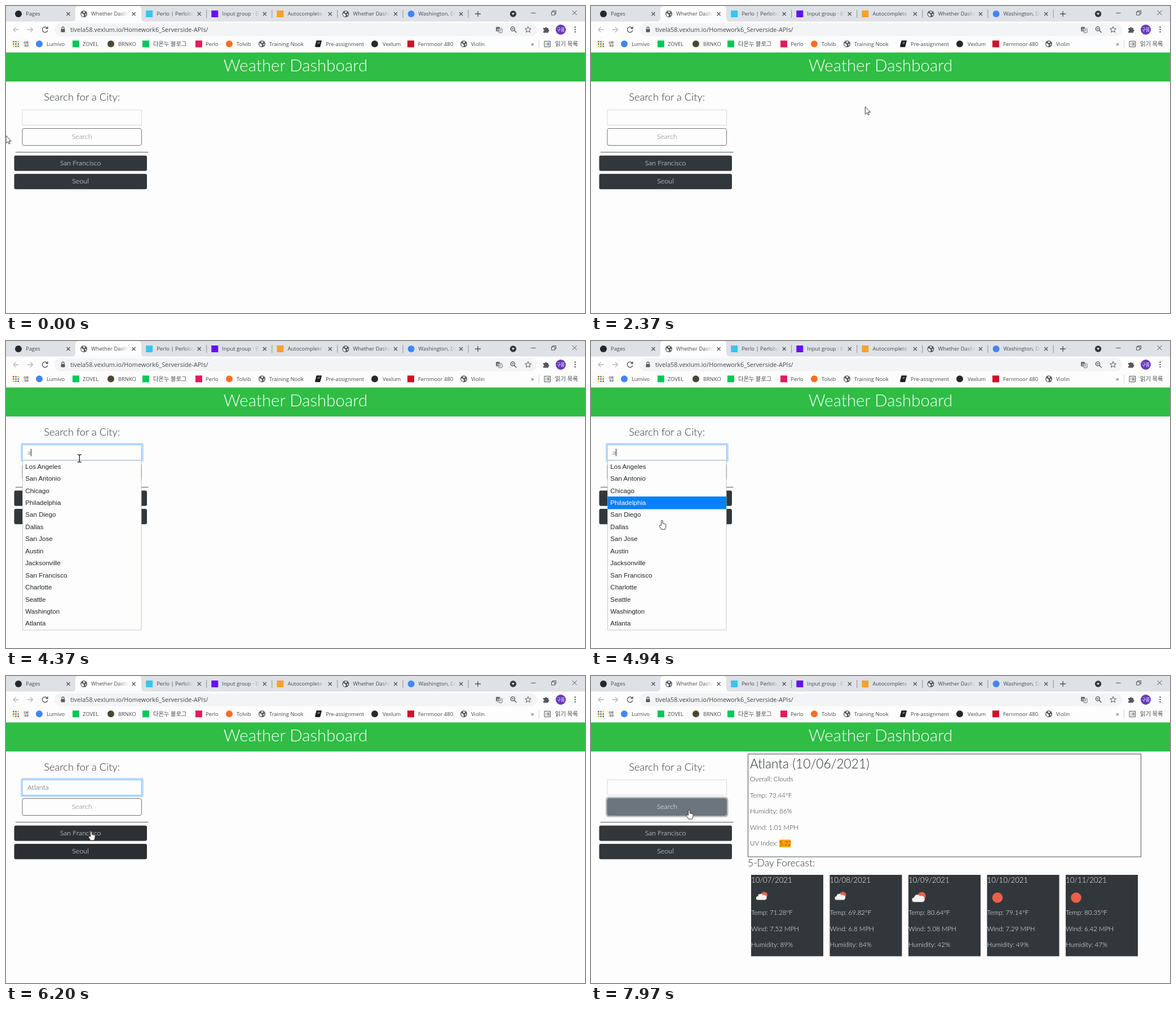
These frames come from a looping animation (1027 by 545 pixels, 8000 ms). An HTML page:

```html
<!DOCTYPE html>
<html lang="en">
<head>
<meta charset="utf-8">
<title>Weather Dashboard</title>
<style>
  html, body { margin: 0; width: 100%; height: 100%; overflow: hidden; background: #fdfdfd; }
  svg { display: block; width: 100vw; height: 100vh; }
  text { white-space: pre; }
  .ui { font: 9.4px "Open Sans", "Noto Sans", sans-serif; fill: #45484c; }
  .ko { font: 10.4px "Noto Sans CJK KR", "Noto Sans CJK", sans-serif; fill: #45484c; }
  .page { font-family: Lato, "Open Sans", sans-serif; font-weight: 300; fill: #2b3035; }
  .list { font: 11.6px "Liberation Sans", Arial, sans-serif; fill: #212529; }
  .line { fill: none; stroke: #4d5156; stroke-width: 1.3; }
  .mid { text-anchor: middle; }
</style>
</head>
<body>
<svg id="stage" viewBox="0 0 1027 545" xmlns="http://www.w3.org/2000/svg"></svg>
<script>
const LOOP = 8000;
const FOCUS = 3150, TYPE = 3900, PICK = 5660, CLICK = 6720, RESULT = 6850, ICONS = 7150;
const LIST_TOP = 212, ROW = 21.45;

const rect = (x, y, w, h, attrs = '') => `<rect x="${x}" y="${y}" width="${w}" height="${h}" ${attrs}/>`;
const circle = (x, y, r, fill) => `<circle cx="${x}" cy="${y}" r="${r}" fill="${fill}"/>`;
const path = (d, attrs = 'class="line"') => `<path d="${d}" ${attrs}/>`;
const text = (x, y, s, cls = 'ui', attrs = '') => `<text x="${x}" y="${y}" class="${cls}" ${attrs}>${s}</text>`;
const page = (x, y, size, s, attrs = '') => text(x, y, s, 'page', `font-size="${size}" ${attrs}`);
const group = (x, y, body, attrs = '') => `<g transform="translate(${x} ${y})" ${attrs}>${body}</g>`;

const icons = {
  dot: c => circle(0, 0, 6, c),
  box: c => rect(-6, -6, 12, 12, `fill="${c}"`),
  globe: () => circle(0, 0, 6, '#55595e') +
    path('M-4.6-1.5L-1.5-.2 .3 2.2-.6 4.8C-3.6 4.6-5 2-4.6-1.5ZM-1.5-4.8L2.4-4.2 1.4-1.6-1-1.9ZM2.4 .3L4.8-.6 3.6 3 2.3 2.6Z', 'fill="#f4f5f6"'),
  book: () => path('M-3-5.5H5.5L3 4.5H-5.5ZM-5 5.2H3.2', 'fill="#1c1c1c" stroke="#1c1c1c"') +
    path('M-1.2-2.8H3M-1.7-.8H2.3', 'stroke="#ddd" stroke-width=".7"')
};
const icon = (x, y, [kind, color]) => group(x, y, icons[kind](color));

const tabs = [
  ['dot', '#24292e', 'Pages'],
  ['globe', '', 'Whether Dashboard'],
  ['box', '#36c5f0', 'Perlo | Perlobot'],
  ['box', '#6610f2', 'Input group · Bootstrap'],
  ['box', '#f5a12d', 'Autocomplete'],
  ['globe', '', 'Whether Dashboard'],
  ['dot', '#4285f4', 'Washington, DC']
];
const bookmarks = [
  [59, 72, 'dot', '#4285f4', 'Lumivo'],
  [124, 136, 'box', '#03c75a', 'ZOVEL'],
  [186, 199, 'dot', '#4a4632', 'BRNKO'],
  [248, 261, 'box', '#03c75a', '다온누 블로그', 'ko'],
  [342, 354, 'box', '#e01e5a', 'Perlo'],
  [396, 409, 'dot', '#fc6d26', 'Tolvib'],
  [454, 467, 'globe', '', 'Training Nook'],
  [554, 567, 'book', '', 'Pre-assignment'],
  [654, 668, 'dot', '#24292e', 'Vexlum'],
  [718, 731, 'box', '#d0112b', 'Fernmoor 480'],
  [812, 825, 'globe', '', 'Violin']
];

function browserBar() {
  const tabStrip = tabs.map(([kind, color, label], i) =>
    group(22 + 116.1 * i, 14,
      icon(0, 0, [kind, color]) + text(13, 3.3, label, 'ui', 'style="fill:url(#fade)"') +
      path('M85.5-3l6 6m0-6l-6 6', 'class="line" style="stroke-width:1.2"') +
      (i > 1 ? path('M101.5-7V7', 'stroke="#8a8d92"') : ''))).join('');
  const apps = [...Array(9).keys()].map(i =>
    rect(12 + i % 3 * 4.2, 62 + Math.floor(i / 3) * 4.2, 2.6, 2.6,
      `fill="${['#ea4335', '#34a853', '#fbbc05', '#4285f4'][(i * 3) % 4]}"`)).join('');
  return rect(0, 0, 1027, 27.5, 'fill="#dee1e6"') +
    path('M117 27.5Q123 27.5 123 21V6Q123 0 129 0H234Q240 0 240 6V21Q240 27.5 246 27.5Z', 'fill="#fdfdfd"') +
    tabStrip +
    path('M832 14h10M837 9v10') +
    circle(899.5, 14, 5.7, '#35383c') + path('M897 12.5h5l-2.5 3.4Z', 'fill="#fff"') +
    path('M931 12.5h8.5M967.5 10.5h6v5.5h-6ZM969.5 10V8.5h6V14h-2M1004.5 8l8 8m0-8l-8 8', 'class="line" style="stroke-width:1"') +
    rect(86, 30.5, 856, 23, 'rx="11.5" fill="#f3f4f5"') +
    path('M22.5 42H13m4.5-4.5L13 42l4.5 4.5M38 42h9.5m-4.5-4.5L47.5 42 43 46.5', 'class="line" style="stroke:#b5b8bc"') +
    path('M73 39a4.8 4.8 0 1 0 .8 4.2M74 36.5V40h-3.5') +
    rect(97.5, 41, 7, 5.5, 'rx="1" fill="#55595e"') + path('M99 41v-1.8a2 2 0 0 1 4 0V41') +
    text(114, 45.7, 'tivela58.vexlum.io/Homework6_Serverside-APIs/', 'ui', 'style="font-size:10.9px"') +
    rect(869, 37, 7, 8, 'rx="1" fill="#6b6f74"') + rect(874, 40, 6, 7.5, 'rx="1" fill="#fff" stroke="#6b6f74"') +
    text(870.4, 43.5, 'A', 'ui', 'style="fill:#fff;font-size:6px"') +
    path('M875.5 42.5h3m-1.5 0l-1.5 3m.5-2l2 2', 'class="line" style="stroke-width:.7"') +
    path('M902.5 40.5a3.6 3.6 0 1 0-7.2 0a3.6 3.6 0 1 0 7.2 0M901.5 43.2l4 4M897.2 40.5h3.4') +
    path('M926 36.5l1.6 3.5 3.8.4-2.9 2.5.9 3.8-3.4-2-3.4 2 .9-3.8-2.9-2.5 3.8-.4Z', 'class="line" style="stroke-width:1"') +
    path('M953 39h3a1.6 1.6 0 0 1 3.2 0H962v3a1.6 1.6 0 0 1 0 3.2V47.5h-9v-2.8a1.5 1.5 0 0 0 0-3Z', 'fill="#55595e"') +
    circle(984, 42, 9, '#673ab7') +
    text(984, 44.8, '구름', 'ko mid', 'style="fill:#fff;font-size:7.6px"') +
    [37.5, 41.7, 45.9].map(y => circle(1009.5, y, 1.2, '#4d5156')).join('') +
    apps + text(31, 70.5, '앱', 'ko') +
    bookmarks.map(([x, tx, kind, color, label, cls]) =>
      icon(x, 67.3, [kind, color]) + text(tx, 70.6, label, cls)).join('') +
    text(931, 70.5, '»', 'ui', 'style="font-size:11px"') +
    path('M945.5 60v15', 'stroke="#d5d8dc"') +
    path('M955 62.5h10.5v10H955ZM957 65.5h1m1.5 0h4.5M957 67.5h1m1.5 0h4.5M957 69.5h1m1.5 0h4.5', 'class="line" style="stroke-width:1"') +
    text(974, 70.5, '읽기 목록', 'ko');
}

function sidebar() {
  const cityButton = (id, y, label) =>
    rect(14.5, y, 235.5, 27.3, `id="${id}" rx="3"`) +
    page(132, y + 17.4, 12.4, label, 'text-anchor="middle" style="fill:#fff"');
  return page(134.7, 168, 18.3, 'Search for a City:', 'text-anchor="middle"') +
    rect(27.5, 182.5, 215, 31, 'id="inputRing" rx="1.5" fill="none" stroke="#bfdeff" stroke-width="3"') +
    rect(29, 184.3, 211.5, 27.2, 'id="input" fill="#fdfdfd"') +
    page(38, 202, 12.4, '', 'id="value" style="fill:#495057"') +
    rect(44, 191.5, 1, 13, 'id="caret" fill="#222"') +
    rect(27.5, 216, 214.5, 33, 'id="searchRing" rx="4" fill="none" stroke="#b5babe" stroke-width="3"') +
    rect(29, 217.5, 211.5, 30, 'id="search" rx="3" fill="#6c757d" stroke="#6c757d"') +
    page(134.7, 236.3, 12.5, 'Search', 'id="searchLabel" text-anchor="middle"') +
    path('M17 259.5H252.5', 'stroke="#55585b"') +
    cityButton('sf', 265.5, 'San Francisco') + cityButton('seoul', 298, 'Seoul');
}

const cities = ['Los Angeles', 'San Antonio', 'Chicago', 'Philadelphia', 'San Diego', 'Dallas', 'San Jose',
  'Austin', 'Jacksonville', 'San Francisco', 'Charlotte', 'Seattle', 'Washington', 'Atlanta'];

function suggestions() {
  return `<g id="list">` +
    rect(29.5, LIST_TOP, 210.5, 301, 'fill="#fdfdfd" stroke="#c9c9b4"') +
    rect(29.5, 0, 210.5, 22.5, 'id="marked" fill="#0a80f8"') +
    cities.map((c, i) => text(34.3, 226.6 + ROW * i, c, 'list city')).join('') + '</g>';
}

const forecast = [
  ['07', '71.28', '7.52', 89, 'cloud'], ['08', '69.82', '6.8', 84, 'cloud'],
  ['09', '80.64', '5.08', 42, 'bigCloud'], ['10', '79.14', '7.29', 49, 'sun'],
  ['11', '80.35', '6.42', 47, 'sun']
];

function weatherIcon(kind) {
  if (kind === 'sun') return circle(0, 0, 9.3, '#e9614a');
  const puffs = circle(5, -3.5, 6.3, '#e9614a') +
    path('M-6.5 6a3.6 3.6 0 0 1-.4-7.2A5 5 0 0 1 2.3-3.3A4.8 4.8 0 0 1 7 6Z', 'fill="#f2f2f2"');
  return `<g transform="${kind === 'bigCloud' ? 'translate(-.5 1) scale(1.12)' : 'translate(0 -1.5) scale(.93)'}">${puffs}</g>`;
}

function results() {
  const rows = ['Overall: Clouds', 'Temp: 73.44ºF', 'Humidity: 86%', 'Wind: 1.01 MPH', 'UV Index:'];
  const cards = forecast.map(([day, temp, wind, humidity, kind], i) => {
    const lines = [`Temp: ${temp}ºF`, `Wind: ${wind} MPH`, `Humidity: ${humidity}%`];
    return group(284 + 139.5 * i, 353,
      rect(0, 0, 128, 125.5, 'class="card" fill="#32373b"') +
      page(0, 13.5, 13.2, `10/${day}/2021`, 'style="fill:#fff"') +
      `<g class="sky">${group(18.5, 40.5, weatherIcon(kind))}</g>` +
      `<g class="facts">${lines.map((s, n) => page(0, 52 + 28.5 * n, 11.6, s, 'style="fill:#fff"')).join('')}</g>`);
  }).join('');
  return '<g id="results">' +
    rect(278.5, 138.5, 697, 182.5, 'fill="none" stroke="#4c4f52"') +
    page(282, 163.5, 22.7, 'Atlanta (10/06/2021)') +
    rect(334, 290.5, 20, 13.5, 'fill="#ffa50a"') +
    rows.map((s, i) => page(282, 187 + 28.5 * i, 11.7, s)).join('') +
    page(334, 301, 11, '5.22') +
    page(278, 337.5, 17.5, '5-Day Forecast:') + cards + '</g>';
}

const pointers = {
  arrow: path('M0 0V13.5L3.2 10.6 5.3 15 7.2 14.1 5.2 9.8H9.3Z', 'fill="#fff" stroke="#222" stroke-width=".9"'),
  hand: path('M-1.3 9V1.2a1.3 1.3 0 0 1 2.6 0V5.5l4.5 1q1.6.4 1.4 2l-.6 4-1.4 3.5H-1L-4.6 10.4q-.6-1.6.9-1.6Z',
    'fill="#fff" stroke="#222" stroke-width=".9"'),
  beam: path('M-3.5-6.5H-1L0-5.8 1-6.5H3.5M0-5.8V5.8M-3.5 6.5H-1L0 5.8 1 6.5H3.5', 'fill="none" stroke="#111" stroke-width="1.2"')
};

const stage = document.getElementById('stage');
stage.innerHTML =
  `<defs><linearGradient id="fade" gradientUnits="userSpaceOnUse" x1="62" x2="79" y1="0" y2="0">
    <stop stop-color="#45484c"/><stop offset="1" stop-color="#45484c" stop-opacity="0"/></linearGradient></defs>` +
  rect(0, 0, 1027, 545, 'fill="#fdfdfd"') + browserBar() +
  rect(0, 82.5, 1027, 51.5, 'fill="#2fbd45"') +
  page(513.5, 116, 29.5, 'Weather Dashboard', 'text-anchor="middle" style="fill:#fff"') +
  sidebar() + results() + suggestions() +
  Object.entries(pointers).map(([name, body]) => `<g id="${name}">${body}</g>`).join('');

const el = Object.fromEntries([...stage.querySelectorAll('[id]')].map(n => [n.id, n]));
const all = selector => [...stage.querySelectorAll(selector)];
const cards = all('.card'), skies = all('.sky'), facts = all('.facts'), cityRows = all('.city');

// Pointer path: time, x, y
const route = [
  [0, 0, 230], [850, 0, 230], [1300, 180, 212], [1800, 420, 186], [2200, 487, 178], [2450, 486, 179],
  [2750, 300, 192], [3000, 140, 206], [3150, 131, 207], [4300, 131, 207], [4500, 129, 211], [4940, 126, 318],
  [5560, 120, 503], [5660, 118, 505], [5880, 113, 509], [6050, 136, 330], [6200, 151, 276], [6450, 165, 250],
  [6650, 171, 242], [6940, 171.5, 243], [7970, 174, 238]
];

function pointerAt(t) {
  const i = route.findIndex(k => k[0] > t);
  if (i < 0) return route[route.length - 1].slice(1);
  if (i === 0) return route[0].slice(1);
  const [t0, x0, y0] = route[i - 1], [t1, x1, y1] = route[i];
  const p = (t - t0) / (t1 - t0);
  return [x0 + (x1 - x0) * p, y0 + (y1 - y0) * p];
}

const listOpen = t => t >= TYPE && t < PICK;

function targetAt(t) {
  const [x, y] = pointerAt(t);
  const within = (x0, x1, y0, y1) => x >= x0 && x <= x1 && y >= y0 && y <= y1;
  if (within(29, 241, 184, 212)) return 'input';
  if (listOpen(t)) return within(29, 240, LIST_TOP, 513) ? 'list' : '';
  if (within(29, 241, 217, 248)) return 'search';
  if (within(14, 250, 265, 293)) return 'sf';
  return within(14, 250, 298, 325) ? 'seoul' : '';
}

// Share of the last 150 ms spent on a button, standing in for its colour transition
function hover(name, t) {
  let hits = 0;
  for (let k = 0; k < 10; k++) hits += targetAt(t - k * 15) === name;
  return hits / 10;
}

const ramp = (t, start) => Math.max(0, Math.min(1, (t - start) / 150));
const show = (node, on) => node.setAttribute('visibility', on ? 'visible' : 'hidden');
const mix = (a, b, p) => `rgb(${a.map((v, i) => Math.round(v + (b[i] - v) * p))})`;

function draw(t) {
  const focus = ramp(t, FOCUS) - ramp(t, CLICK);
  el.inputRing.setAttribute('opacity', focus);
  el.input.setAttribute('stroke', mix([214, 217, 226], [128, 189, 255], focus));
  el.value.textContent = t < TYPE || t >= CLICK ? '' : t < PICK ? 'a' : 'Atlanta';

  const since = t - (t >= PICK ? PICK : t >= TYPE ? TYPE : FOCUS);
  show(el.caret, t >= FOCUS && t < CLICK && since % 1000 < 500);
  el.caret.setAttribute('x', t < TYPE ? 38 : t < PICK ? 44 : 76);

  const lit = Math.max(hover('search', t), ramp(t, CLICK));
  el.search.setAttribute('fill-opacity', lit);
  el.searchLabel.style.fill = mix([108, 117, 125], [255, 255, 255], lit);
  el.searchRing.setAttribute('opacity', ramp(t, CLICK));
  for (const name of ['sf', 'seoul'])
    el[name].setAttribute('fill', mix([50, 55, 59], [35, 39, 43], hover(name, t)));

  const open = listOpen(t);
  const row = Math.floor((pointerAt(t - 100)[1] - LIST_TOP) / ROW);
  const marked = open && t > 4500 && row >= 0 ? Math.min(row, cities.length - 1) : -1;
  show(el.list, open);
  show(el.marked, marked >= 0);
  el.marked.setAttribute('y', LIST_TOP - .3 + ROW * marked);
  cityRows.forEach((c, i) => c.style.fill = i === marked ? '#fff' : '#212529');

  const loaded = t >= ICONS;
  el.results.style.display = t >= RESULT ? '' : 'none';
  cards.forEach(c => c.setAttribute('height', loaded ? 144.5 : 125.5));
  skies.forEach(s => s.style.display = loaded ? '' : 'none');
  facts.forEach(f => f.setAttribute('transform', `translate(0 ${loaded ? 19 : 0})`));

  const target = targetAt(t), [x, y] = pointerAt(t);
  const shape = target === 'input' ? 'beam' : target ? 'hand' : 'arrow';
  for (const name in pointers) show(el[name], name === shape);
  el[shape].setAttribute('transform', `translate(${x} ${y})`);
}

const start = performance.now();
function tick() {
  draw((performance.now() - start) % LOOP);
  requestAnimationFrame(tick);
}
tick();
</script>
</body>
</html>
```
